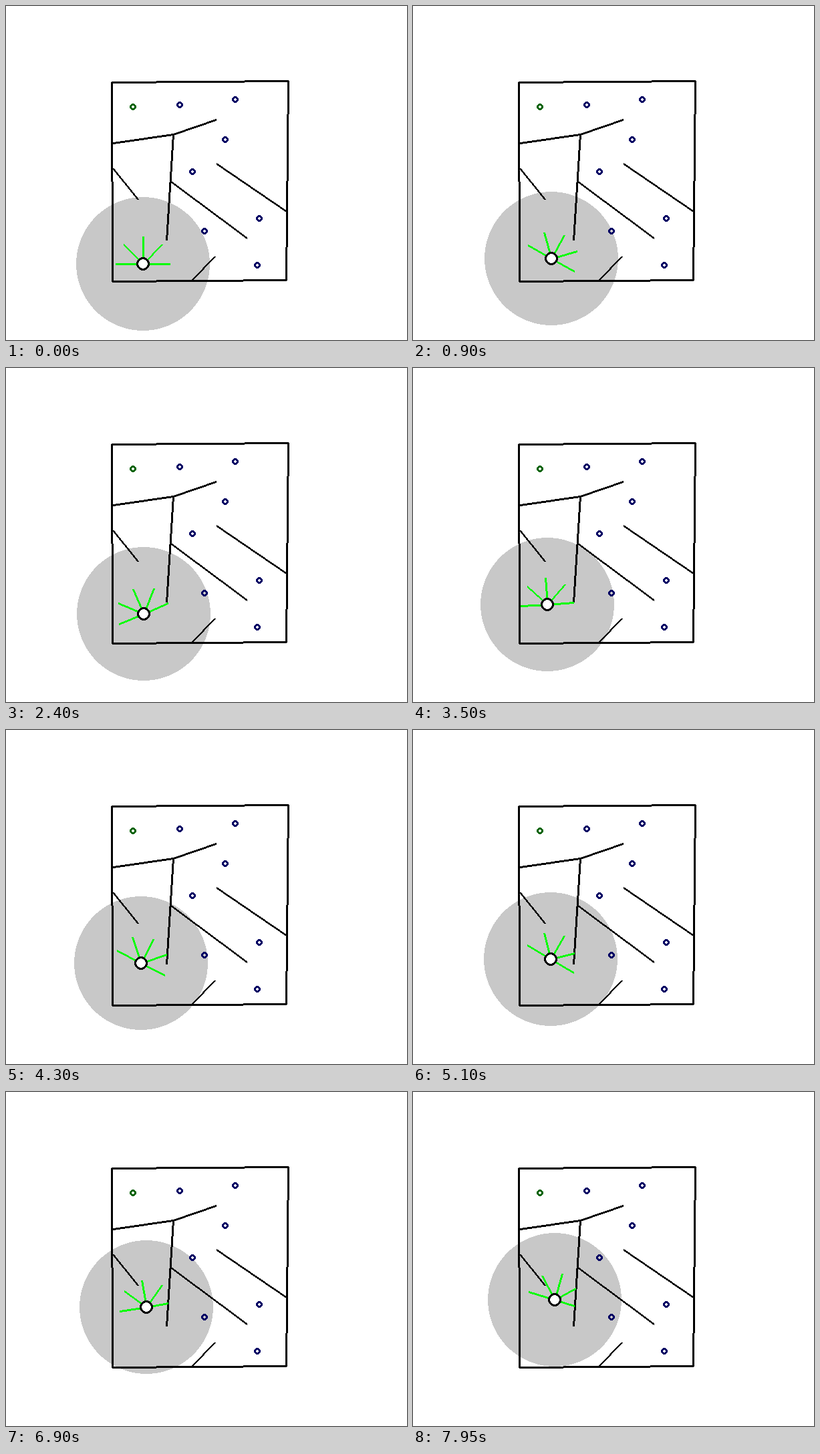
Write a matplotlib script that moves like this. It is 600 by 500 pixels and loops after 8 s.

```python
import numpy as np
import matplotlib.pyplot as plt
from matplotlib.animation import FuncAnimation

W, H = 600, 500
FRAMES, STEP = 160, 50
SENSE, RAY = 100, 40
RAY_ANGLES = (90, 45, 0, -45, -90)

WHITE, BLACK, GRAY = (255,) * 3, (0,) * 3, (200,) * 3
NAVY, GREEN, LIME = (0, 0, 100), (0, 100, 0), (0, 255, 0)

PATHS = [
    [(158, 114), (422, 112), (419, 410), (159, 412), (158, 114)],
    [(160, 205), (250, 192), (314, 170)],
    [(250, 192), (240, 350)],
    [(247, 263), (360, 347)],
    [(315, 236), (419, 307)],
    [(160, 243), (197, 289)],
    [(278, 410), (312, 375)],
]
WALLS = [(p, q) for path in PATHS for p, q in zip(path, path[1:])]
MARKS = [(260, 148), (343, 140), (328, 200), (279, 248),
         (297, 337), (379, 318), (376, 388)]
GOAL = (190, 151)

# (frame, value): turning points of heading and sway, waypoints of the climb
TURN = [(0, 90), (20, 60), (52, 115), (95, 57), (142, 100), (162, 71.5)]
SWAY = [(0, 205), (31, 208.3), (75, 200.8), (128, 211.8),
        (145, 209.6), (160, 212.1)]
CLIMB = [(0, 386), (18, 378), (34, 373), (48, 367.6), (68, 355),
         (102, 343), (119, 332), (138, 322.3), (153, 315.8), (159, 311.2)]

Y, X = np.mgrid[:H, :W] + 0.5


def swing(keys, n):
    """Cosine easing from one turning point to the next."""
    for (t0, v0), (t1, v1) in zip(keys, keys[1:]):
        if n <= t1:
            s = (n - t0) / (t1 - t0)
            return v0 + (v1 - v0) * (1 - np.cos(np.pi * s)) / 2


def disc(img, center, r, color, hole=0):
    d = np.hypot(X - center[0], Y - center[1])
    img[(d < r - 0.1) & (d > hole - 0.1)] = color


def line(img, p, q, color):
    """Hard-edged line, three pixels wide along its minor axis."""
    (x0, y0), (x1, y1) = p, q
    steps = max(abs(x1 - x0), abs(y1 - y0))
    xs, ys = (np.floor(np.linspace(a, b, steps + 1) + 0.5).astype(int)
              for a, b in ((x0, x1), (y0, y1)))
    flat = abs(x1 - x0) >= abs(y1 - y0)
    for k in (-1, 0, 1):
        img[ys + k * flat, xs + k * (not flat)] = color


def reach(x, y, dx, dy):
    """Ray length up to the nearest wall."""
    best = RAY
    for (ax, ay), (bx, by) in WALLS:
        ex, ey = bx - ax, by - ay
        det = dx * ey - dy * ex
        if abs(det) < 1e-9:
            continue
        d = ((ax - x) * ey - (ay - y) * ex) / det
        u = ((ax - x) * dy - (ay - y) * dx) / det
        if 0 <= u <= 1 and 0 <= d < best:
            best = d
    return best


def render(n):
    img = np.full((H, W, 3), 255, np.uint8)
    x = round(swing(SWAY, n))
    y = round(np.interp(n, *zip(*CLIMB)))
    heading = swing(TURN, n)

    disc(img, (x, y), SENSE, GRAY)
    for p, q in WALLS:
        line(img, p, q, BLACK)
    for p in MARKS:
        disc(img, p, 5, NAVY, hole=2)
    disc(img, GOAL, 5, GREEN, hole=2)

    for offset in RAY_ANGLES:
        a = np.radians(heading + offset)
        dx, dy = np.cos(a), -np.sin(a)
        d = reach(x, y, dx, dy) + 1e-6
        line(img, (x, y), (int(x + d * dx), int(y + d * dy)), LIME)
    disc(img, (x, y), 10, BLACK)
    disc(img, (x, y), 7, WHITE)
    return img


fig = plt.figure(figsize=(W / 100, H / 100), dpi=100, facecolor="white")
picture = fig.figimage(render(0), origin="upper")


def draw(n):
    picture.set_data(render(n))
    return [picture]


anim = FuncAnimation(fig, draw, frames=FRAMES, interval=STEP,
                     repeat=True, repeat_delay=0, blit=False)
plt.show()
```
